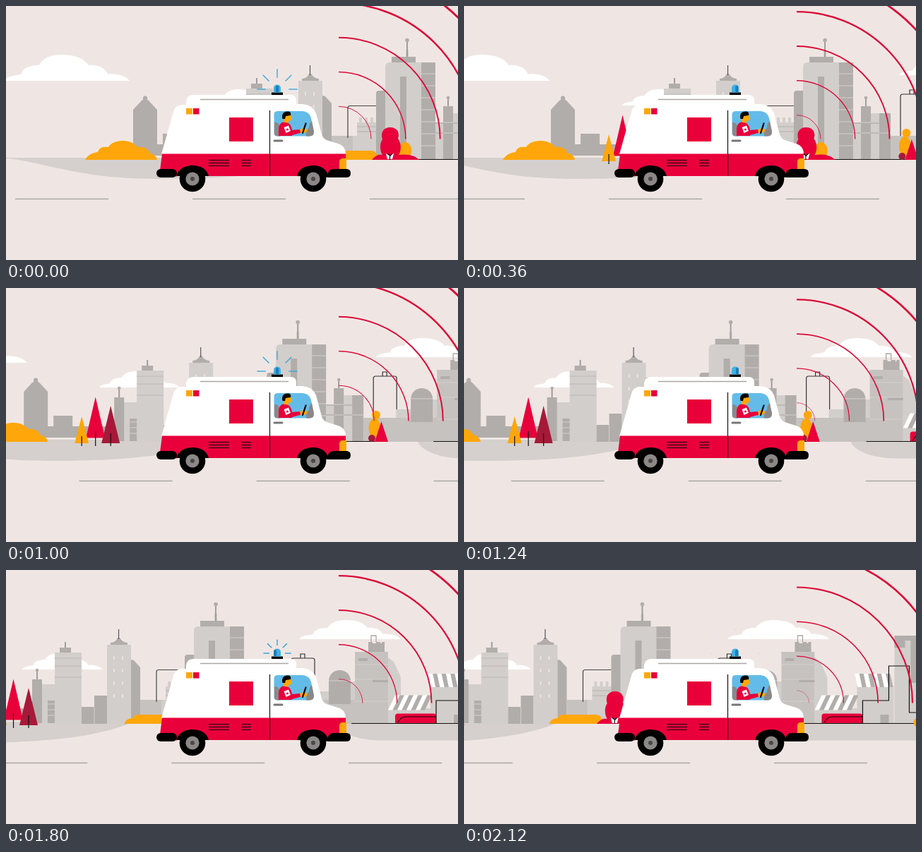
Recreate the animation shown at these times as an HTML page. Size 640 by 360 pixels, loop 2160 ms.

```html
<!DOCTYPE html>
<html lang="en">
<head>
<meta charset="utf-8">
<title>Ambulance drive</title>
<style>
  html, body { margin: 0; width: 100%; height: 100%; overflow: hidden; background: #efe6e3; }
  svg { display: block; width: 100vw; height: 100vh; }
  .ground { fill: #d5d0cd; }
  .light { fill: #d2cecb; }
  .mid { fill: #c6c2bf; }
  .dark { fill: #b1adaa; }
  .white { fill: #fff; }
  .red { fill: #e9003a; }
  .wine { fill: #a71938; }
  .orange { fill: #ffa60a; }
  .blue { fill: #63bce8; }
  .line { fill: none; stroke: #111; stroke-width: 1.2; }
  .thin { fill: none; stroke: #aaa6a4; stroke-width: 1.3; }
  .seam { fill: none; stroke: #d5d0cd; stroke-width: 1; }
  .pole { fill: none; stroke: #a09c9a; stroke-width: 2; }
  #rings { fill: none; stroke: #dc0a37; }
  #rays { stroke: #3aa5dc; }
</style>
</head>
<body>
<svg viewBox="0 0 640 360" preserveAspectRatio="none">
  <defs>
    <path id="cloud" class="white" d="M0 27C4 21 14 22 20 20C22 12 34 11 40 11C46 2 56 0 66 0C82 0 92 4 97 11C108 10 116 14 119 20C130 19 140 22 144 27Z"/>
    <g id="wheel">
      <circle r="18.3"/>
      <circle r="9.6" fill="#8b8887"/>
      <circle r="3" fill="#4a4848"/>
    </g>
  </defs>

  <g id="clouds">
    <use href="#cloud" transform="translate(-3 69) scale(1.236 1.37)"/>
    <use href="#cloud" transform="translate(277 118) scale(.79 .85)"/>
    <use href="#cloud" transform="translate(669 71)"/>
  </g>

  <path d="M0 215.5H640" stroke="#cbc5c2" fill="none"/>

  <g id="city">
    <!-- ground -->
    <path class="ground" d="M-5 215C60 222 100 245 215 245C320 245 400 238 452 215ZM738 217C740 230 770 241.500 800 241.500H1000V217Z"/>

    <!-- west blocks -->
    <path class="dark" d="M180 212V147L192 134L194 133V129L197 127L200 129V133L202 134L214 147V196H222V181H249V196H308V212Z"/>
    <path class="light" d="M321 217V162H341V217Z"/>
    <path class="dark" d="M308 217V155H322V217ZM330 217V185H341V217Z"/>
    <path class="seam" d="M330 190H341M330 198H341M330 206H341"/>
    <path class="pole" d="M315 142V155"/>
    <circle class="dark" cx="315" cy="142" r="2.3"/>

    <!-- capped tower and its neighbours -->
    <path class="light" d="M340 218V117H378V218Z"/>
    <path class="dark" d="M347 117V110H363V117ZM378 218V194H396V178H414V218Z"/>
    <path class="seam" d="M396 194V218"/>
    <path class="seam" style="stroke:#bdb8b5" d="M340 125H378M340 136H378M340 152H378"/>
    <path class="pole" d="M355 102V110"/>

    <!-- peaked tower -->
    <path class="light" d="M414 218V106H448V218Z"/>
    <path class="dark" d="M448 218V127L452 128L461 138V218ZM419 106V103Q426 103 429 96H432Q436 103 443 103V106Z"/>
    <path class="line" style="stroke:#555" d="M430.500 84V98"/>
    <path d="M424 122V182M436 122V182" stroke="#efe6e3" stroke-width="1.600" stroke-dasharray="5 13"/>

    <!-- low rooftops -->
    <path class="mid" d="M461 218V184H491V218Z"/>
    <path class="light" d="M491 218V184H497V165H500V158H504V165H508V158H512V165H516V158H520V165H525V218Z"/>
    <path class="seam" style="stroke:#b5b0ad" d="M497 171H524M497 178H524"/>
    <path class="line" style="stroke:#444" d="M484 187V144.500Q484 141.500 487 141.500H524"/>

    <!-- tall tower -->
    <path class="dark" d="M524 218V124Q524 120 528 120H538V218ZM587 218V80H608V218ZM546 80V72H580V80Z"/>
    <path class="light" d="M537 218V86Q537 80 543 80H588V218Z"/>
    <path class="dark" d="M558 218V100H567V218Z"/>
    <path class="seam" d="M588 96H608M588 113H608M588 130H608M588 147H608M588 164H608M588 181H608M588 198H608"/>
    <path class="light" d="M566 72V62H570V72Z"/>
    <path class="pole" d="M568 48V72"/>
    <circle class="dark" cx="568" cy="48.500" r="2.800"/>

    <!-- twin blocks -->
    <path class="light" d="M608 218V165H619V218ZM633 218V152H646V218Z"/>
    <path class="dark" d="M619 218V142H633V218ZM645 218V152H661V218Z"/>
    <path class="seam" d="M619 165H633M619 180H633M645 180H661"/>
    <path class="seam" style="stroke:#a7a3a0" d="M608 166H619M608 180H619M633 166H645M633 180H645"/>
    <path class="pole" d="M626 130V142"/>
    <circle class="dark" cx="626" cy="130" r="2.300"/>

    <!-- pipe frame and dome -->
    <path class="light" d="M707 190V172H728V158H766V190Z"/>
    <path class="mid" d="M661 218V184H766V218Z"/>
    <path class="dark" d="M728 190V157C729 137 758 137 759 157V190Z"/>
    <path class="seam" d="M728 157H759"/>
    <path class="line" style="stroke:#333" d="M675 184V128Q675 125 678 125H705Q708 125 708 128V172M688 125V119H694V125"/>

    <!-- chimney block -->
    <path class="light" d="M812 218V124L820 130L830 152V218Z"/>
    <path class="mid" d="M765 218V116H812V218Z"/>
    <path class="dark" d="M784 116V102H790V104H795V102H801V104H803V102H807V116ZM770 125h13v4h-13zM790 155h22v4h-22z"/>
    <path class="seam" d="M765 134H812M765 155H812M765 186H812"/>
    <path class="thin" d="M788 102V93H795V102"/>

    <!-- shops -->
    <path class="light" d="M818 218V196H872V164H924V218ZM925 218V93H1000V218Z"/>
    <path class="dark" d="M925 110V93H1000V100H940V110ZM905 205h12v13h-12zM948 100h52v60h-52z"/>
    <g id="awnings"></g>
    <path class="red" d="M822 217.500V207Q822 203.500 826 203.500H876Q880 203.500 880 207.500V217.500Z"/>
    <path class="line" d="M760 217.500H1000M826 216Q829 208 838 208H880M880 217V185H917V136H946V202H960"/>
    <circle class="orange" cx="959" cy="216" r="7"/>

    <!-- west plants -->
    <path class="orange" d="M112 218C116 211 122 208 130 207C132 200 138 199 145 200C149 193 158 191 166 191C175 191 183 195 186 200C196 199 202 203 203 208C210 210 213 213 214 218Z"/>
    <path class="red" d="M281.500 154.500L295 212.500H268Z"/>
    <path class="orange" d="M262 182L272 220H252Z"/>
    <path class="wine" d="M303 167L316 220H290Z"/>
    <path class="line" d="M262 210V224M281.500 203V224M303 206V224"/>
  </g>

  <g id="plants">
    <path class="line" d="M520 217.500H686"/>
    <path class="orange" d="M451 218C453 212 458 210 463 210C464 206 468 205 474 205H516Q525 205 525 212V218Z"/>
    <ellipse class="orange" cx="565" cy="205" rx="9.500" ry="12"/>
    <path class="red" d="M518 218C524 211 529 210 533 211C529 205 529 194 533 189C530 180 534 172 544 172C554 172 558 180 555 188C560 194 560 206 556 211C568 209 580 212 585 218Z"/>
    <path class="white" d="M538 209L543 212L549 209L547 217H540Z"/>
    <path class="line" d="M543.500 218V212L540 209M543.500 213L547 209"/>
    <circle class="orange" cx="686" cy="180" r="6"/>
    <ellipse class="orange" cx="684" cy="199" rx="8.500" ry="14"/>
    <path class="red" d="M693.500 189L703 218H684Z"/>
    <circle class="wine" cx="680" cy="213" r="5"/>
  </g>

  <g id="rings"></g>
  <path id="road" class="thin" d="M13 273.500H145M264 273.500H396M515 273.500H647M766 273.500H898M1017 273.500H1149"/>

  <!-- ambulance -->
  <g>
    <rect x="376" y="122.500" width="16" height="3.500"/>
    <path style="fill:#3fb0e6" d="M379 122.500V117Q379 111.500 384 111.500Q389 111.500 389 117V122.500Z"/>
    <path id="shade" fill="#1c7fba" d="M-2 122.500V114L0 112.500L2 114V122.500Z"/>
    <g id="rays" transform="translate(384 118)"></g>

    <path class="white" d="M220 210L237 150Q239 141 248 140H255V135Q256 126 266 126H403Q411 126 411 134V139H420Q434 140 439 152L447 182Q449 189 457 191L470 195Q481 198 481 210Z"/>
    <path class="thin" d="M275 132.500H400"/>
    <path class="red" d="M221 209.500H481V241H217Z"/>
    <path class="orange" d="M482 216V231H472V221Q472 216 477 216Z"/>
    <path d="M241 243C243 231 253 226 264 226S285 231 287 241H241ZM412 241C414 231 424 226 435 226S454 231 458 243Z"/>
    <rect x="213" y="231" width="29" height="12" rx="6"/>
    <path d="M456 243V237Q457 231 464 231H482Q488 231 488 237T482 243Z"/>
    <use href="#wheel" x="264" y="245"/>
    <use href="#wheel" x="435" y="245"/>
    <path class="line" d="M373.500 148V241M287 218.500H316M287 222.500H316M287 226.500H316M333 218.500H347M333 222.500H347M333 226.500H347"/>
    <rect class="orange" x="255" y="145" width="9" height="8.500"/>
    <rect class="red" x="265" y="145" width="8.500" height="8.500"/>
    <rect class="red" x="316" y="158" width="34" height="34"/>
    <path d="M380 191H391" stroke="#777" stroke-width="3" stroke-linecap="round"/>

    <path class="blue" d="M385 149H420Q430 150 432 159L436 178Q436 184.500 430 184.500H385Q379.500 184.500 379.500 180V154Q379.500 149 385 149Z"/>
    <path fill="#8b8887" d="M380 165Q386 164 388 172V184.500H385Q380 184.500 380 180ZM433 163L436 178Q436 184.500 430 184.500H425Q424 176 429 173Q429 166 433 163Z"/>
    <path class="orange" d="M393 156L403 154L405 160L402 163H400V168H393Z"/>
    <path d="M391.500 160C390 153 393 150 398 149.500C402 149 404 151 403 155L396 156L395 160Z"/>
    <path class="red" d="M386 184V175Q386 167 392 164.500L400 166Q404 169 405 176L416 175L418 179.500L405 183V184Z"/>
    <path class="white" d="M393.500 172L400 169.500L403 177L396.500 180Z"/>
    <circle class="red" cx="398.500" cy="175" r="1.600"/>
    <path class="orange" d="M416 175L421 173L427 175L425 179L417 180.500Z"/>
    <path d="M420 180L424.500 166.500" stroke="#000" stroke-width="2.200" stroke-linecap="round"/>
  </g>
</svg>

<script>
  const LOOP = 2160, STEP = 40;
  const RING_GAP = 48.8, RING_TIME = 480;
  const $ = id => document.getElementById(id);

  function add(parent, tag, attrs = {}) {
    const el = document.createElementNS("http://www.w3.org/2000/svg", tag);
    for (const key in attrs) el.setAttribute(key, attrs[key]);
    parent.append(el);
    return el;
  }

  function awning(x, y, width, height, lean) {
    const count = 8, w = width / count;
    for (let i = 0; i < count; i++) {
      const left = x + i * w;
      add($("awnings"), "path", {
        class: i % 2 ? "dark" : "white",
        d: `M${left} ${y + height}l${lean} ${-height}h${w}l${-lean} ${height}z`
      });
    }
  }
  awning(812, 177.5, 52, 21, 10);
  awning(873, 147, 50, 19, -4);

  const rings = Array.from({ length: 6 }, () => add($("rings"), "path"));
  const rays = [0, 45, 90, 135, 180].map(deg =>
    add($("rays"), "line", { transform: `rotate(${-deg})` }));

  const move = (id, x) => $(id).setAttribute("transform", `translate(${x.toFixed(2)} 0)`);

  function drawRings(t) {
    const phase = (0.945 + t / RING_TIME) % 1;
    rings.forEach((ring, i) => {
      const r = (i + phase) * RING_GAP;
      ring.setAttribute("d", `M471 ${188.5 - r}A${r} ${r} 0 0 1 ${471 + r} 188.5`);
      ring.setAttribute("stroke-width", 0.5 + r * 0.01);
      ring.setAttribute("opacity", Math.min(1, r / 30));
    });
  }

  function drawBeacon(t) {
    const phase = t % 1000;
    const p = ((phase + 280) % 1000) / 420;
    $("rays").style.display = p < 1 ? "" : "none";
    $("rays").setAttribute("stroke-width", Math.max(0, 1.5 * (1 - p ** 6)));
    rays.forEach(ray => {
      ray.setAttribute("x1", 11 + 27 * p ** 4);
      ray.setAttribute("x2", 16 + 19 * p);
    });
    move("shade", 384 + 3 * Math.sin(phase / 1000 * 2 * Math.PI));
  }

  function frame(now) {
    const t = Math.floor(now % LOOP / STEP) * STEP;
    const way = 0.1659 * t - 5.5e-6 * t * t; // the drive slows slightly
    move("clouds", -0.905 * way);
    move("city", -0.965 * way);
    move("plants", -1.01 * way);
    move("road", -way);
    drawRings(t);
    drawBeacon(t);
  }

  const start = performance.now();
  function tick() {
    frame(performance.now() - start);
    requestAnimationFrame(tick);
  }
  tick();
</script>
</body>
</html>
```
